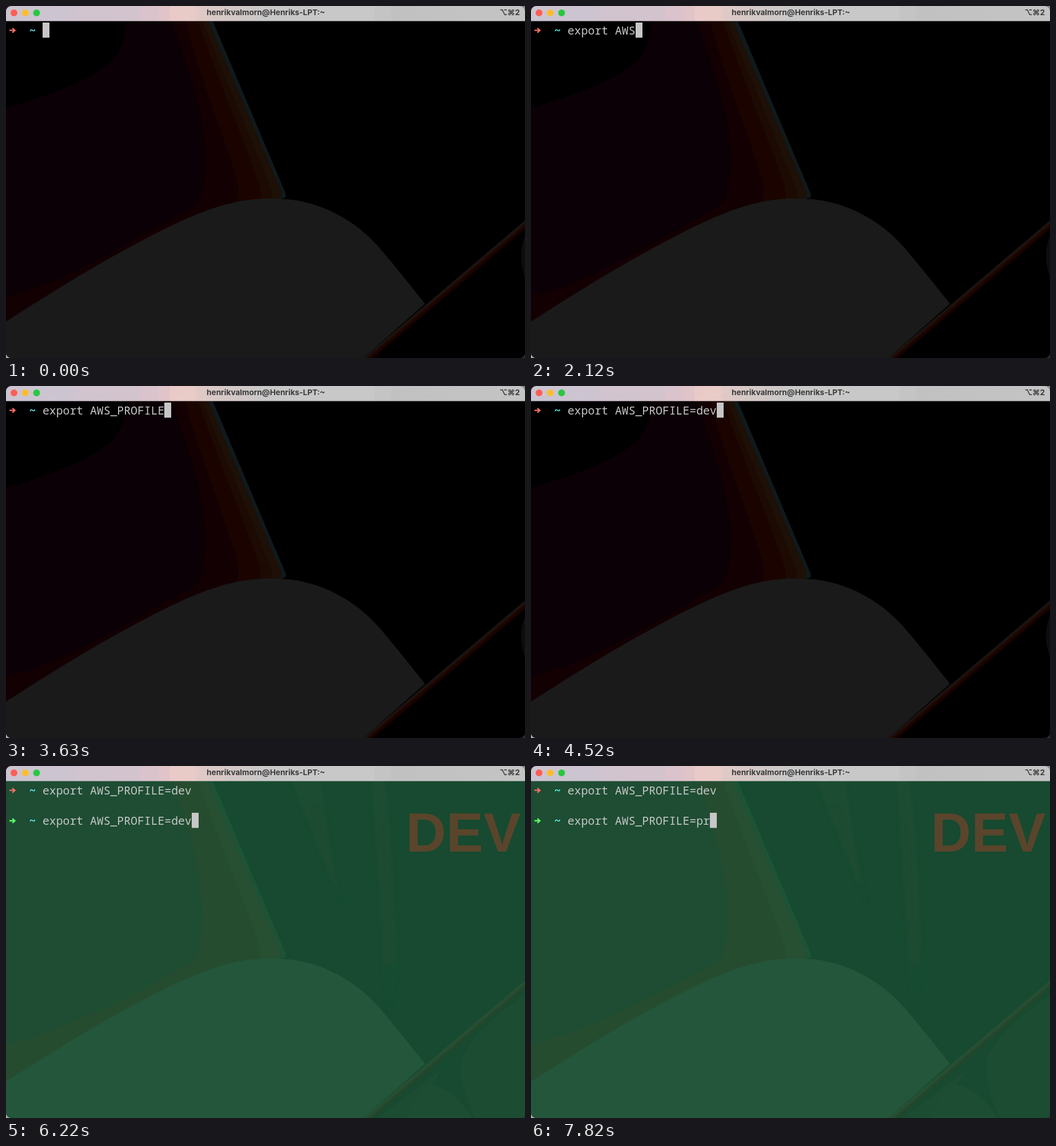
An HTML page that plays this animation: 908 px wide and 617 px high, repeating every 8000 ms.

```html
<!DOCTYPE html>
<html lang="en">
<head>
<meta charset="utf-8">
<title>Terminal profile</title>
<style>
  html, body { margin: 0; width: 100%; height: 100%; overflow: hidden; background: #888; }
  svg { display: block; width: 100vw; height: 100vh; }
  .mono { font: 19.75px "Noto Sans Mono", "DejaVu Sans Mono", monospace; fill: #c7c7c7; white-space: pre; }
  .tilde { font-weight: 700; fill: #5ffdff; }
  .bar { font: 700 13.6px Inter, "DejaVu Sans", sans-serif; fill: #3b3a3b; }
  .badge { font: 700 97px "Liberation Sans", Arial, sans-serif; letter-spacing: .5px; fill: #5a452c; }
</style>
</head>
<body>
<svg viewBox="0 0 908 617" preserveAspectRatio="none">
  <defs>
    <clipPath id="window"><rect width="908" height="617" rx="9"/></clipPath>
    <linearGradient id="barFill" gradientUnits="userSpaceOnUse" x1="0" x2="908">
      <stop offset="0" stop-color="#cbc5d1"/>
      <stop offset=".134" stop-color="#cdc4d0"/>
      <stop offset=".135" stop-color="#d1c4cf"/>
      <stop offset=".258" stop-color="#d3c3cd"/>
      <stop offset=".259" stop-color="#dac3cc"/>
      <stop offset=".293" stop-color="#dac3cb"/>
      <stop offset=".294" stop-color="#dfc4c9"/>
      <stop offset=".315" stop-color="#e1c4c8"/>
      <stop offset=".316" stop-color="#eacac8"/>
      <stop offset=".366" stop-color="#e8cbc7"/>
      <stop offset=".367" stop-color="#e1c9c6"/>
      <stop offset=".43" stop-color="#d3c8c6"/>
      <stop offset=".5" stop-color="#c9c8c8"/>
      <stop offset=".709" stop-color="#c8c8c8"/>
      <stop offset=".711" stop-color="#c4c4c4"/>
      <stop offset=".742" stop-color="#c4c4c4"/>
      <stop offset=".743" stop-color="#c1c1c1"/>
      <stop offset="1" stop-color="#c4c4c4"/>
    </linearGradient>
    <linearGradient id="darkEdge" gradientUnits="userSpaceOnUse" x1="733" y1="524" x2="742" y2="534.6">
      <stop offset="0" stop-color="#1a1816"/>
      <stop offset=".3" stop-color="#1c100c"/>
      <stop offset=".45" stop-color="#1f0500"/>
      <stop offset=".75" stop-color="#150200"/>
      <stop offset="1" stop-color="#000"/>
    </linearGradient>
    <linearGradient id="greenEdge" gradientUnits="userSpaceOnUse" x1="733" y1="523" x2="743" y2="534.7">
      <stop offset="0" stop-color="#255137"/>
      <stop offset=".35" stop-color="#274e32"/>
      <stop offset=".6" stop-color="#23462b"/>
      <stop offset="1" stop-color="#174a30"/>
    </linearGradient>
    <linearGradient id="fadeDown" x1="0" x2="0" y1="0" y2="1">
      <stop offset="0" stop-color="#1d4d30"/>
      <stop offset=".7" stop-color="#1b4c30"/>
      <stop offset="1" stop-color="#174a30"/>
    </linearGradient>
    <filter id="soft"><feGaussianBlur stdDeviation="3"/></filter>
    <path id="rim" d="M0 27H362L489 328q3 9-6 9L0 600Z"/>
    <path id="beam" d="M0 27H354L481 324q4 13-6 14L0 600Z"/>
    <path id="beamMid" d="M0 27H344L464 320q5 14-2 20L0 600Z"/>
    <path id="beamIn" d="M0 27H336C376 140 434 280 444 318Q448 334 442 345L0 600Z"/>
    <path id="hill" d="M0 553C60 515 130 470 205 429S345 355 405 343C440 336 480 336 510 341C560 350 610 376 650 420C685 461 710 493 733 522L625 617H0Z"/>
    <path id="slope" d="M625 617L908 376V617Z"/>
  </defs>

  <rect width="454" height="300" fill="#22101f"/>
  <rect x="454" width="454" height="300" fill="#8a8a8a"/>
  <rect y="300" width="454" height="317" fill="#b4b4b4"/>
  <rect x="454" y="300" width="454" height="317" fill="#333"/>
  <g clip-path="url(#window)">
    <g id="dark">
      <rect width="908" height="617"/>
      <use href="#rim" fill="#10191c"/>
      <use href="#beam" fill="#1d1006"/>
      <use href="#beamMid" fill="#1d0b03"/>
      <use href="#beamIn" fill="#1b0400"/>
      <path fill="#130003" d="M0 27H314C340 130 395 260 406 315Q409 335 400 350L0 600Z"/>
      <path fill="#0a0005" d="M0 27H290C320 110 350 200 350 265C350 330 340 345 320 357C220 410 100 490 0 508Z"/>
      <path d="M0 27H211C208 60 200 85 180 100C140 135 60 162 0 178Z"/>
      <use href="#hill" fill="#1a1a1a"/>
      <use href="#slope" fill="url(#darkEdge)"/>
      <path fill="#0d0d0d" d="M908 403Q894 438 908 475Z"/>
    </g>

    <g id="green">
      <rect width="908" height="617" fill="#174a30"/>
      <path fill="url(#fadeDown)" filter="url(#soft)" d="M500 27H550Q566 150 588 246Q545 140 500 27Z"/>
      <path fill="url(#fadeDown)" filter="url(#soft)" d="M640 20H662Q684 220 682 370L672 432Q660 400 658 300Z"/>
      <use href="#rim" fill="#1b5436"/>
      <use href="#beam" fill="#274f32"/>
      <use href="#beamIn" fill="#264c2f"/>
      <path fill="#1e4d33" d="M0 27H293C322 110 346 200 344 265C342 325 340 338 316 351C220 400 110 463 0 488Z"/>
      <use href="#hill" fill="#23563b"/>
      <use href="#slope" fill="url(#greenEdge)"/>
      <path fill="#1c4d32" d="M908 402C850 440 810 480 797 515C794 550 805 585 820 617H908Z"/>
      <path fill="#1c4d32" d="M652 617L765 529Q745 560 715 592L700 617Z"/>
      <path fill="#1d4e33" d="M700 617Q720 560 745 559Q785 566 816 617Z"/>
      <text class="badge" x="699.7" y="150">DEV</text>
    </g>

    <rect width="908" height="26.5" fill="url(#barFill)"/>
    <circle cx="14" cy="12" r="6" fill="#ff5f57"/>
    <circle cx="33.7" cy="12" r="6" fill="#febc2e"/>
    <circle cx="53.5" cy="12" r="6" fill="#28c840"/>
    <text class="bar" x="454.7" y="16.3" text-anchor="middle">henrikvalmorn@Henriks-LPT:~</text>
    <text class="bar" x="899" y="15.5" text-anchor="end">⌥⌘2</text>

    <g id="lines"></g>
    <rect id="cursor" width="12" height="26.5" fill="#c7c7c7"/>
  </g>
</svg>
<script>
const LOOP = 8000, CELL = 11.85, LEFT = 64, ROW = 53.3;
const command = "export AWS_PROFILE=dev";
const ENTER = 4960, RECALL = 6220;
const keyTimes = [710, 890, 1060, 1240, 1330, 1500, 1590, 1770, 1940, 2120, 2390,
  2750, 2920, 3010, 3280, 3460, 3545, 3630, 3900, 4160, 4340, 4520];
const edits = [[6760, "de"], [6930, "d"], [7110, ""], [7740, "p"], [7820, "pr"]];
const byId = id => document.getElementById(id);

function add(parent, tag, attrs, text = "") {
  const node = document.createElementNS("http://www.w3.org/2000/svg", tag);
  for (const key in attrs) node.setAttribute(key, attrs[key]);
  node.textContent = text;
  parent.append(node);
  return node;
}

function makeLine(row, color) {
  const group = add(byId("lines"), "g", { transform: `translate(0 ${row * ROW})` });
  add(group, "path", { d: "M6 42.7H14.5M11.2 38.8L15.6 42.7L11.2 46.6", fill: "none",
    stroke: color, "stroke-width": 2.3 });
  add(group, "text", { class: "mono tilde", x: 40.4, y: 49.5 }, "~");
  const text = add(group, "text", { class: "mono", x: LEFT, y: 49.5 });
  return { group, text };
}

const first = makeLine(0, "#ff6e67");
const second = makeLine(1, "#5ff967");

function secondText(t) {
  if (t < RECALL) return "";
  const edit = edits.filter(([at]) => t >= at).pop();
  return edit ? command.slice(0, -3) + edit[1] : command;
}

function render(t) {
  const entered = t >= ENTER;
  const typed = command.slice(0, keyTimes.filter(at => t >= at).length);
  const current = entered ? secondText(t) : typed;
  first.text.textContent = typed;
  second.text.textContent = entered ? current : "";
  second.group.style.display = byId("green").style.display = entered ? "" : "none";
  byId("dark").style.display = entered ? "none" : "";
  // The cursor sits on whole pixels.
  byId("cursor").setAttribute("x", Math.round(LEFT + current.length * CELL));
  byId("cursor").setAttribute("y", Math.round(29 + (entered ? ROW : 0)));
}

const start = performance.now();
function tick() {
  render((performance.now() - start) % LOOP);
  requestAnimationFrame(tick);
}
tick();
</script>
</body>
</html>
```
